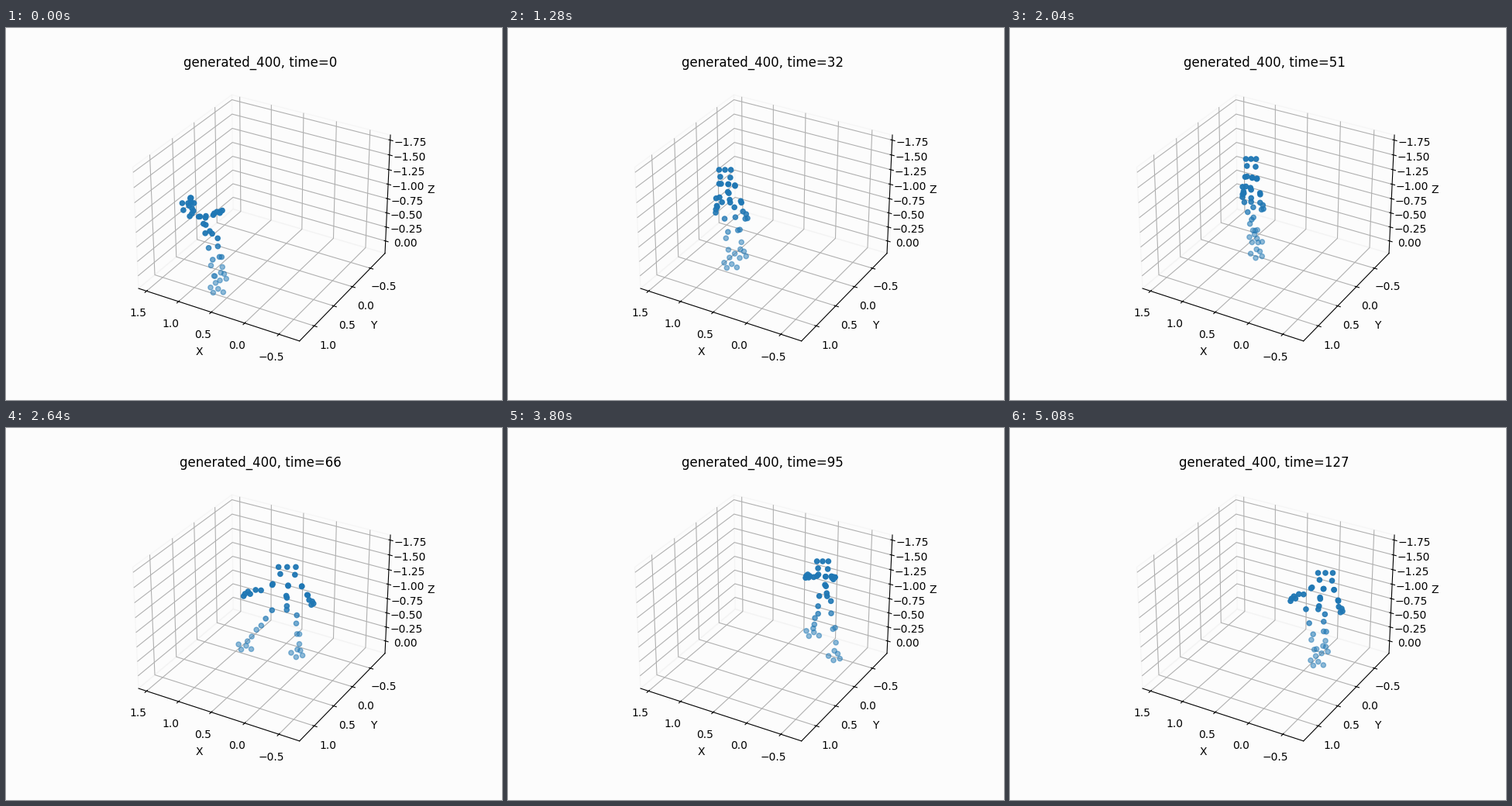
Write a matplotlib script that moves like this. It is 640 px wide and 480 px high and loops after 5.12 s.

```python
import numpy as np
import matplotlib.pyplot as plt
from matplotlib.animation import FuncAnimation

FRAMES, STEP = 128, 40
PAPER = "#fcfcfc"
BLUE = (31 / 255, 119 / 255, 180 / 255)

# The figure's key points on the stage at each key time.
KEYS = np.array([0, 16, 32, 51, 78, 95, 127])
PATHS = {
    "head": [(235, 229), (256, 194), (280, 186), (311, 172),
             (398, 189), (406, 175), (407, 190)],
    "pelvis": [(266, 268), (253, 247), (285, 228), (309, 228),
               (397, 241), (410, 220), (395, 237)],
    "hand_l": [(238, 218), (203, 231), (268, 236), (300, 216),
               (321, 212), (384, 191), (362, 221)],
    "hand_r": [(277, 236), (333, 266), (307, 246), (325, 234),
               (439, 218), (420, 193), (427, 237)],
    "foot_l": [(272, 338), (270, 312), (287, 306), (317, 273),
               (315, 289), (393, 265), (396, 303)],
    "foot_r": [(279, 321), (277, 314), (302, 292), (320, 292),
               (418, 291), (423, 295), (405, 286)],
}
TRACKS = np.array(list(PATHS.values()), float)
SLOPES = np.gradient(TRACKS, KEYS, axis=1)

ARM = np.array([0, .06, .46, .54, .8, .87, .95, 1])
SPINE = np.array([0, .08, .4, .5, .75, .9])
LEG = np.array([.25, .47, .55, .75, .9])
JITTER = np.random.default_rng(4).uniform(-2.5, 2.5, (60, 2))


def key_points(t):
    """Smooth Hermite curve through the key points."""
    k = min(np.searchsorted(KEYS, t, side="right") - 1, len(KEYS) - 2)
    h = KEYS[k + 1] - KEYS[k]
    s = (t - KEYS[k]) / h
    ease = s * s * (3 - 2 * s)
    return (TRACKS[:, k] * (1 - ease) + TRACKS[:, k + 1] * ease
            + SLOPES[:, k] * h * s * (1 - s) ** 2
            - SLOPES[:, k + 1] * h * s * s * (1 - s))


def along(a, b, parts):
    return a + (b - a) * parts[:, None]


def markers(t):
    """Marker places and opacities, far ones first."""
    head, pelvis, *ends = key_points(t)
    hands, feet = ends[:2], ends[2:]
    chest = head + (pelvis - head) * .37
    half = np.array([2 + .18 * (hands[1][0] - hands[0][0]), 2])

    # Head: three markers in front, two behind
    wide = 4 + .4 * half[0]
    groups = [head + [(wide * u, 8 * abs(u) % 8 - 3) for u in (-1, 0, 1)],
              head + [(-.8 * wide, 6), (.9 * wide, 7)],
              along(chest, pelvis, SPINE)]
    for side, hand, foot in zip((-1, 1), hands, feet):
        hip = pelvis + side * .9 * half
        groups += [along(chest + side * half, hand, ARM), [hip]]
        leg = along(hip, foot, LEG)
        leg[:, 1] -= .4 * abs(foot[0] - hip[0]) * LEG * (1 - LEG)
        turn = np.arange(4) * np.pi / 2 + .4
        groups += [leg, foot + np.c_[8 * np.cos(turn), 4 * np.sin(turn)]]

    xy = np.vstack(groups)
    xy[5:] += JITTER[:len(xy) - 5]
    # Lower parts lie further from the viewer
    drop = (xy[:, 1] - head[1]) / (max(f[1] for f in feet) - head[1])
    alpha = np.clip(1.38 - 1.2 * drop, .5, .95)
    order = np.argsort(alpha)
    return xy[order], alpha[order]


plt.rcParams["text.kerning_factor"] = 6
fig = plt.figure(figsize=(6.4, 4.8), dpi=100, facecolor=PAPER)
ax = fig.add_subplot(projection="3d", facecolor=PAPER)
ax.set(xlim=(1.626, -.797), ylim=(1.364, -.919), zlim=(.222, -1.835),
       xlabel="X", ylabel="Y", zlabel="Z")
for axis in (ax.xaxis, ax.yaxis, ax.zaxis):
    axis.pane.set_facecolor(PAPER)
    axis.pane.set_edgecolor("#f0f0f0")
title = ax.set_title("generated_400, time=0")

stage = fig.add_axes([0, 0, 1, 1], zorder=5)
stage.set(xlim=(0, 640), ylim=(480, 0))
stage.axis("off")
dots = stage.scatter([], [], s=20)


def draw(i):
    xy, alpha = markers(i)
    dots.set_offsets(xy)
    dots.set_facecolor([(*BLUE, a) for a in alpha])
    dots.set_edgecolor("face")
    title.set_text(f"generated_400, time={i}")
    return dots, title


anim = FuncAnimation(fig, draw, frames=FRAMES, interval=STEP,
                     init_func=lambda: draw(0), repeat=True, repeat_delay=0)
plt.show()
```
